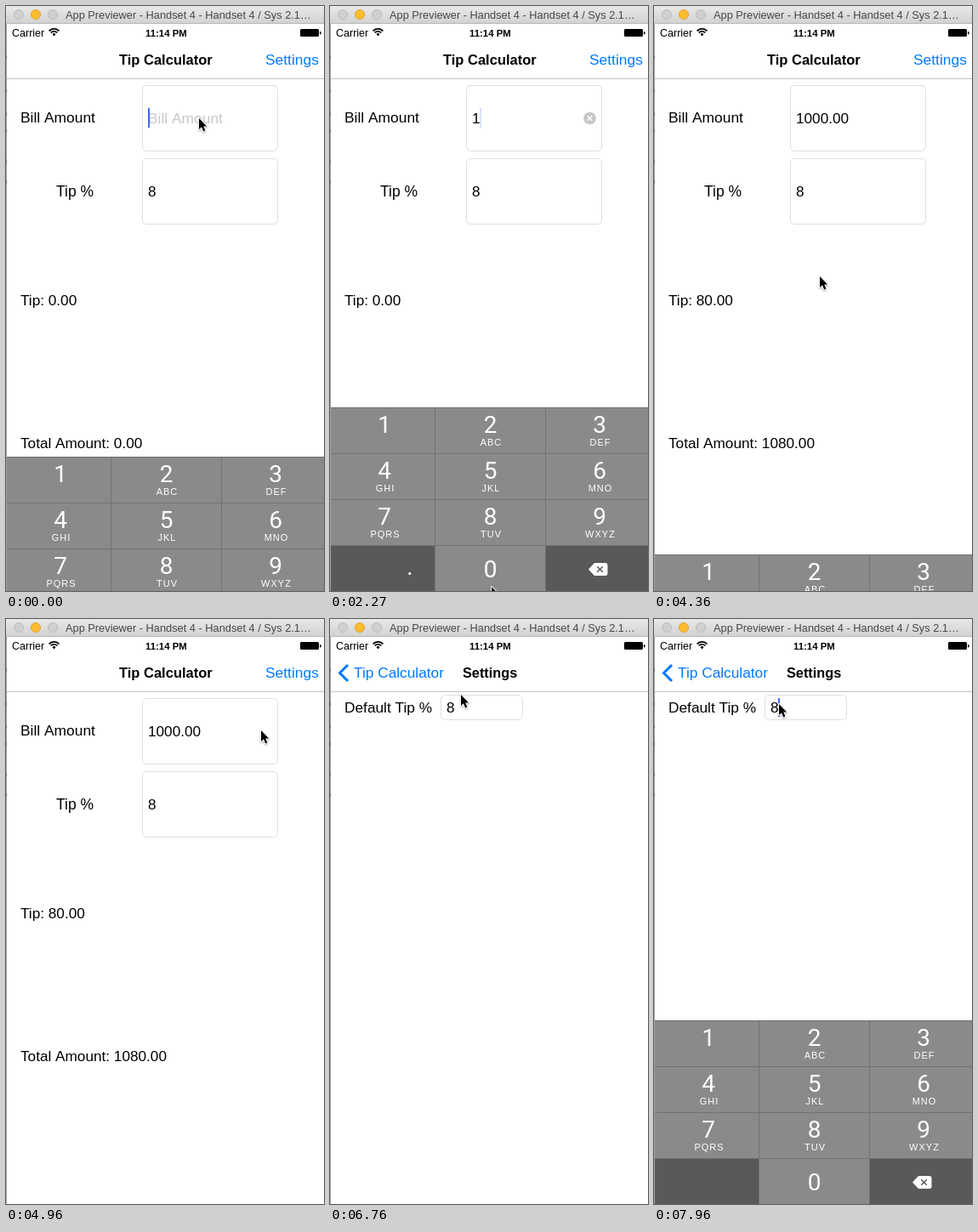
An HTML page with a canvas that plays this animation: 374 px wide and 688 px high, repeating every 8000 ms.

```html
<!DOCTYPE html>
<html lang="en">
<head>
<meta charset="utf-8">
<title>Tip Calculator</title>
<style>
html, body { margin: 0; width: 100%; height: 100%; overflow: hidden; background: #fff; }
canvas { display: block; width: 374px; height: 688px; }
</style>
</head>
<body>
<canvas id="stage" width="374" height="688"></canvas>
<script>
const ctx = document.getElementById('stage').getContext('2d');
const W = 374, H = 688, LOOP = 8000, STEP = 150;
const SANS = '"Liberation Sans", Arial, sans-serif';
const LIGHT = 'Roboto, "Liberation Sans", sans-serif';
const BLUE = '#007aff', KEY = '#8a8a8a', KEY_DARK = '#595959';

// Pointer stops: step, x, y
const PATH = [
  [0, 227, 132], [2, 226, 135], [5, 150, 330], [8, 42, 503], [11, 40, 504],
  [12, 60, 505], [13, 121, 507], [14, 165, 600], [15, 190, 683], [16, 215, 663],
  [23, 215, 663], [24, 212, 610], [26, 198, 360], [27, 195, 318], [29, 195, 318],
  [31, 235, 240], [34, 333, 77], [36, 337, 66], [40, 336, 65], [41, 335, 65],
  [43, 240, 80], [45, 154, 89], [47, 148, 101], [48, 148, 101], [49, 147, 100], [53, 147, 100]
];
// Bill field contents: first step, value
const BILL = [[0, ''], [11, '1'], [19, '10'], [22, '100'], [23, '1000'], [28, '1000.00']];
const PRESSES = { 10: '1', 18: '0', 21: '0', 22: '0' };
const LETTERS = ['', 'ABC', 'DEF', 'GHI', 'JKL', 'MNO', 'PQRS', 'TUV', 'WXYZ'];
const COLS = [[0, 123, 64], [123, 253, 188.5], [253, 374, 317]];

const clamp = v => Math.max(0, Math.min(1, v));
const mix = (a, b, p) => a + (b - a) * p;

// Remaining distance of a critically damped spring after ms
function spring(ms) {
  const s = Math.max(0, ms) * 0.01826;
  return (1 + s) * Math.exp(-s);
}

function pointerAt(k) {
  const i = Math.max(1, PATH.findIndex(p => p[0] >= k));
  const a = PATH[i - 1], b = PATH[i], p = (k - a[0]) / (b[0] - a[0]);
  return [mix(a[1], b[1], p), mix(a[2], b[2], p)].map(Math.round);
}

function rect(x, y, w, h, color) {
  ctx.fillStyle = color;
  ctx.fillRect(x, y, w, h);
}

function text(str, x, y, size, { color = '#000', weight = 400, align = 'left', family = SANS, alpha = 1, spacing = 0 } = {}) {
  ctx.save();
  ctx.globalAlpha *= alpha;
  ctx.font = `${weight} ${size}px ${family}`;
  ctx.letterSpacing = spacing + 'px';
  ctx.textAlign = align;
  ctx.fillStyle = color;
  ctx.fillText(str, x, y);
  ctx.restore();
}

function circle(x, y, r, fill, line) {
  ctx.beginPath();
  ctx.arc(x, y, r, 0, 7);
  ctx.fillStyle = fill;
  ctx.fill();
  if (line) strokePath(line, 1);
}

function strokePath(color, width) {
  ctx.strokeStyle = color;
  ctx.lineWidth = width;
  ctx.stroke();
}

function cross(x, y, r, color, width) {
  ctx.beginPath();
  ctx.moveTo(x - r, y - r); ctx.lineTo(x + r, y + r);
  ctx.moveTo(x + r, y - r); ctx.lineTo(x - r, y + r);
  strokePath(color, width);
}

function polygon(points) {
  ctx.beginPath();
  points.forEach(([x, y]) => ctx.lineTo(x, y));
  ctx.closePath();
}

function field(x, y, w, h) {
  ctx.beginPath();
  ctx.roundRect(x + .5, y + .5, w - 1, h - 1, 5);
  strokePath('#dedede', 1);
}

function caret(x, y, h, age) {
  const d = age % 1000;
  ctx.globalAlpha = d < 500 ? 1 : clamp((625 - d) / 125) + clamp((d - 950) / 50);
  rect(x, y, 2, h, '#426bf2');
  ctx.globalAlpha = 1;
}

function windowBar() {
  const g = ctx.createLinearGradient(0, 0, 0, 20);
  g.addColorStop(0, '#e9e9e9');
  g.addColorStop(1, '#d2d2d2');
  rect(0, 0, W, 20, g);
  rect(0, 20, W, 1, '#b8b8b8');
  circle(15, 10, 5.5, '#d0d0d0', '#bcbcbc');
  circle(35, 10, 5.5, '#fdbd2e', '#e2a02c');
  circle(55, 10, 5.5, '#d0d0d0', '#bcbcbc');
  text('App Previewer - Handset 4 - Handset 4 / Sys 2.1…', 70, 15, 12.8, { color: '#484848' });
}

function statusBar() {
  text('Carrier', 7, 35.5, 12.5);
  text('11:14 PM', 164, 35.5, 11.4, { weight: 700 });
  for (const r of [8.2, 5.2]) {
    ctx.beginPath();
    ctx.arc(56.5, 35, r, -Math.PI * .76, -Math.PI * .24);
    strokePath('#000', 1.7);
  }
  ctx.beginPath();
  ctx.moveTo(56.5, 35.5);
  ctx.arc(56.5, 35, 2.8, -Math.PI * .76, -Math.PI * .24);
  ctx.fillStyle = '#000';
  ctx.fill();
  ctx.beginPath();
  ctx.roundRect(346, 27, 22, 9, 1.5);
  ctx.roundRect(369, 30, 1.5, 3.5, .7);
  ctx.fill();
}

function navBar(p, pressed) {
  rect(0, 85, W, 1, '#c4c4c4');
  const x = mix(133, 28, p);
  text('Tip Calculator', x, 69, 16.5, { weight: 700, alpha: 1 - p });
  text('Settings', 305, 69, 17.4, { color: BLUE, alpha: (pressed ? .2 : 1) * (1 - p) });
  if (!p) return;
  text('Tip Calculator', x, 69, 17.3, { color: BLUE, alpha: p });
  text('Settings', mix(305, 156, p), 69, 16.3, { weight: 700, alpha: p });
  ctx.globalAlpha = p;
  ctx.beginPath();
  ctx.moveTo(21, 54); ctx.lineTo(11.5, 63.5); ctx.lineTo(21, 73);
  strokePath(BLUE, 3);
  ctx.globalAlpha = 1;
}

function calculator(k, t) {
  const [since, bill] = BILL.filter(b => b[0] <= k).pop();
  const done = k >= 28;
  text('Bill Amount', 17, 137, 17.4);
  text('Tip %', 59, 224, 17.5);
  field(160, 93, 160, 78);
  field(160, 179, 160, 78);
  text('8', 167, 224, 17.2);
  text(done ? 'Tip: 80.00' : 'Tip: 0.00', 17, 352, 17.2);
  text(done ? 'Total Amount: 1080.00' : 'Total Amount: 0.00', 17, 520, 17.2);
  if (bill) text(bill, 167, 138, 17.2);
  else text('Bill Amount', 167, 138, 17.4, { color: '#c7c7cd' });
  if (done) return;
  if (bill) {
    circle(305.5, 132, 7.3, '#c7c7c7');
    cross(305.5, 132, 2.7, '#fff', 1.5);
  }
  caret(Math.round(167 + bill.length * 9.3), 120, 23, t - since * STEP);
}

function settings(k, t) {
  rect(0, 86, W, H, '#fff');
  text('Default Tip %', 17, 110, 17.3);
  field(130, 89, 97, 30);
  text('8', 137, 110, 17.2);
  if (k >= 50) caret(146, 93, 22, t - 50 * STEP);
}

function keypad(top, pressed, decimal) {
  if (top >= H) return;
  ctx.save();
  ctx.translate(0, top);
  rect(0, 0, W, 216, KEY);
  for (let i = 0; i < 12; i++) {
    const row = Math.floor(i / 3), y = row * 54;
    const [left, right, mid] = COLS[i % 3];
    const label = i < 9 ? String(i + 1) : ['', '0', ''][i - 9];
    if (i === 9 || i === 11 || (label && label === pressed)) rect(left, y, right - left, 54, KEY_DARK);
    text(label, mid, y + (row < 3 ? 30 : 37.5), 28, { color: '#fff', weight: 400, align: 'center', family: LIGHT });
    if (row < 3) text(LETTERS[i], mid + 1, y + 45, 11, { color: '#fff', align: 'center', spacing: 1 });
  }
  for (const y of [0, 54, 108, 162]) rect(0, y, W, 1, '#727272');
  for (const x of [123, 253]) rect(x, 0, 1, 216, '#727272');
  if (decimal) text('.', 94, 197, 28, { color: '#fff', align: 'center', family: LIGHT });
  polygon([[304, 190.5], [311, 183], [325, 183], [326.5, 185], [326.5, 196], [325, 198], [311, 198]]);
  ctx.fillStyle = '#fff';
  ctx.fill();
  cross(317.5, 190.5, 3.3, KEY_DARK, 1.5);
  ctx.restore();
}

function pointer(x, y) {
  ctx.save();
  ctx.translate(x, y);
  polygon([[0, 0], [0, 13], [3, 10.3], [5.2, 15.5], [7.4, 14.6], [5.3, 9.6], [9.2, 9.4]]);
  ctx.lineJoin = 'round';
  ctx.shadowColor = 'rgba(0, 0, 0, .35)';
  ctx.shadowBlur = 2;
  ctx.shadowOffsetY = 1;
  strokePath('#fff', 2);
  ctx.shadowColor = 'transparent';
  ctx.fillStyle = '#000';
  ctx.fill();
  ctx.restore();
}

function draw(k) {
  const t = k * STEP;
  const push = k < 41 ? 0 : 1 - spring(t - 6080);
  const hidden = t < 4186 ? spring(t + 142) : t < 7000 ? 1 - spring(t - 4186) : spring(t - 7490);

  rect(0, 0, W, H, '#fff');
  ctx.save();
  ctx.beginPath();
  ctx.rect(0, 86, W, H);
  ctx.clip();
  ctx.translate(-W * .3 * push, 0);
  calculator(k, t);
  ctx.restore();
  if (push) {
    ctx.save();
    ctx.translate(Math.round(W * (1 - push)), 0);
    settings(k, t);
    ctx.restore();
  }
  statusBar();
  navBar(push, k === 40);
  keypad(Math.round(472 + 216 * hidden), PRESSES[k], k < 41);
  rect(0, 21, 1, H, '#a4a4a4');
  for (const y of [58, 98, 125, 145, 181, 205]) rect(0, y, 1, 4, '#777');
  windowBar();
  pointer(...pointerAt(k));
}

function tick() {
  draw(Math.floor(performance.now() % LOOP / STEP));
  requestAnimationFrame(tick);
}
tick();
</script>
</body>
</html>
```
